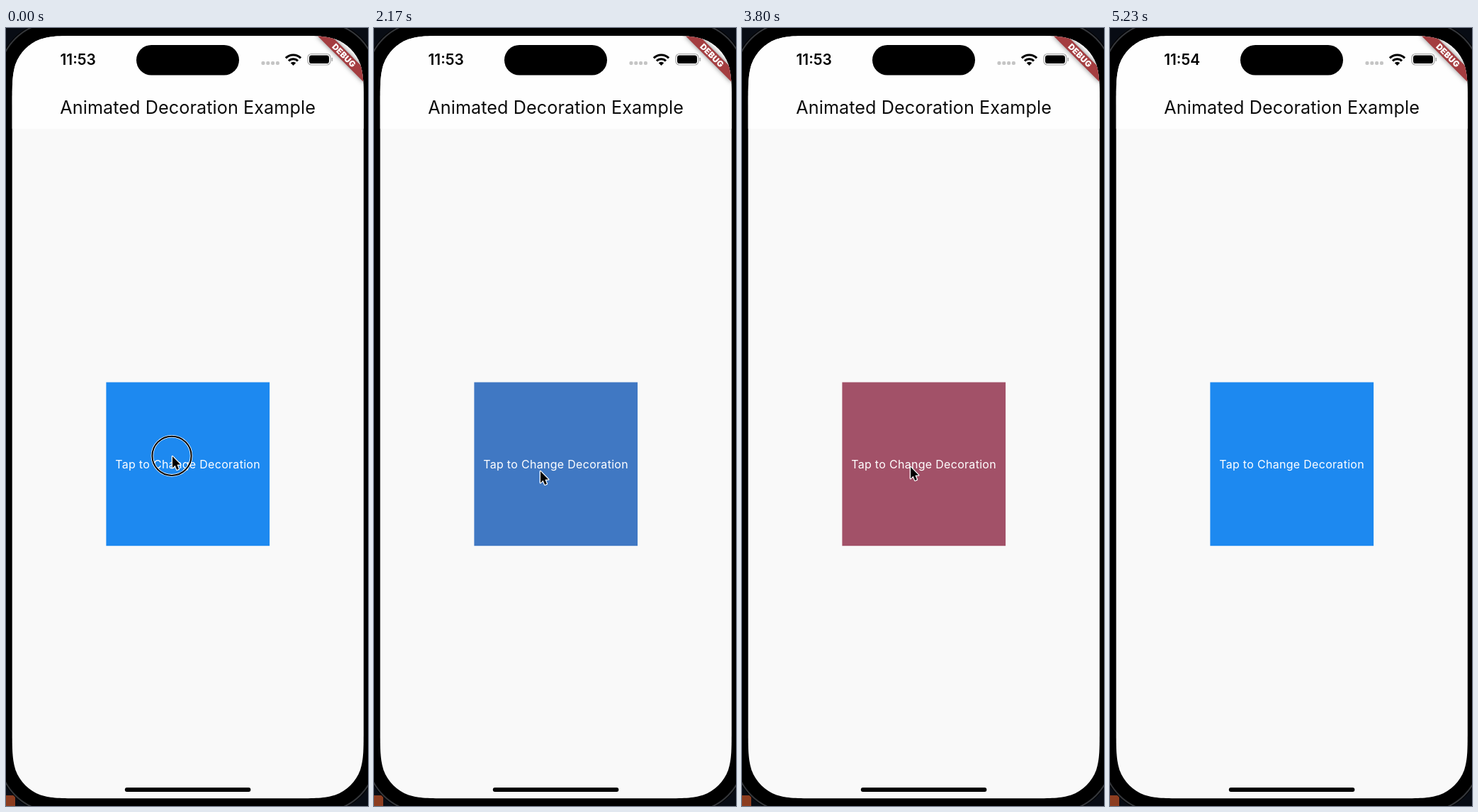
Animation, 511 px wide and 1097 px high, one loop 5.26 s. Source, as an HTML page with a canvas:

```html
<!DOCTYPE html>
<html lang="en">
<head>
<meta charset="utf-8">
<title>Animated Decoration Example</title>
<style>
  html, body { margin: 0; width: 100%; height: 100%; overflow: hidden; background: #000; }
  canvas { display: block; width: 511px; height: 1097px; }
</style>
</head>
<body>
<canvas id="stage"></canvas>
<script>
const W = 511, H = 1097, LOOP = 5260;
const FONT = 'Inter, Roboto, sans-serif';
const canvas = document.getElementById('stage');
const ctx = canvas.getContext('2d');
const ratio = window.devicePixelRatio || 1;
canvas.width = Math.round(W * ratio);
canvas.height = Math.round(H * ratio);

// Each entry: position, then the value or values there
const SWING = [[2056, 0], [2716, 1], [3376, 0], [4025, 1], [4660, 0]];
const COLOURS = [
  [0, 29, 137, 240], [0.173, 64, 120, 195], [0.225, 75, 114, 178],
  [0.409, 112, 102, 150], [0.653, 162, 81, 104], [1, 232, 58, 52]
];
const POINTER = [[1850, 234, 602], [2030, 234, 623], [3400, 234, 623], [3700, 237, 617]];
const PRESS_END = 2030, POINTER_END = 4200, CLOCK_TICK = 4650;

function track(keys, x) {
  if (x <= keys[0][0]) return keys[0].slice(1);
  for (let i = 1; i < keys.length; i++) {
    const a = keys[i - 1], b = keys[i];
    if (x <= b[0]) {
      const k = (x - a[0]) / (b[0] - a[0]);
      return a.slice(1).map((v, j) => v + (b[j + 1] - v) * k);
    }
  }
  return keys[keys.length - 1].slice(1);
}

function roundBox(x, y, w, h, r) {
  ctx.beginPath();
  ctx.roundRect(x, y, w, h, r);
}

// Box with corners of continuous curvature
function smoothBox(x, y, w, h, r) {
  const [a, b, c, d, e, f, g] = [1.5287, 1.0885, 0.8684, 0.6315, 0.3728, 0.1691, 0.0749].map(v => v * r);
  const corner = (cx, cy, ux, uy) => {
    // u runs along the incoming edge, v along the outgoing one
    const vx = -uy, vy = ux;
    const at = (p, q) => [cx - ux * p + vx * q, cy - uy * p + vy * q];
    ctx.lineTo(...at(a, 0));
    ctx.bezierCurveTo(...at(b, 0), ...at(c, 0), ...at(d, g));
    ctx.bezierCurveTo(...at(e, f), ...at(f, e), ...at(g, d));
    ctx.bezierCurveTo(...at(0, c), ...at(0, b), ...at(0, a));
  };
  ctx.beginPath();
  corner(x + w, y, 1, 0);
  corner(x + w, y + h, 0, 1);
  corner(x, y + h, -1, 0);
  corner(x, y, 0, -1);
  ctx.closePath();
}

function fillBox(x, y, w, h, r, fill) {
  roundBox(x, y, w, h, r);
  ctx.fillStyle = fill;
  ctx.fill();
}

function label(str, x, y, size, weight, fill, spacing = 0) {
  ctx.font = `${weight} ${size}px ${FONT}`;
  ctx.letterSpacing = spacing + 'px';
  ctx.textAlign = 'center';
  ctx.textBaseline = 'alphabetic';
  ctx.fillStyle = fill;
  ctx.fillText(str, x, y);
}

function drawCase() {
  ctx.fillStyle = '#080c14';
  ctx.fillRect(0, 0, W, H);
  ctx.fillStyle = '#8c3d20';
  ctx.fillRect(0, 1082, 13, 15);
  smoothBox(-14, -12, 541, 1121, 88);
  ctx.fillStyle = '#000';
  ctx.fill();
  smoothBox(-12, -10, 537, 1117, 86);
  ctx.strokeStyle = '#35373b';
  ctx.lineWidth = 2;
  ctx.stroke();
}

function drawWifi() {
  const x = 405.5, y = 53;
  const from = -Math.PI * 0.75, to = -Math.PI * 0.25;
  ctx.fillStyle = ctx.strokeStyle = '#000';
  ctx.beginPath();
  ctx.moveTo(x, y);
  ctx.arc(x, y, 5.3, from, to);
  ctx.fill();
  ctx.lineWidth = 3.1;
  for (const r of [9.2, 15]) {
    ctx.beginPath();
    ctx.arc(x, y, r, from, to);
    ctx.stroke();
  }
}

function drawStatus(time) {
  label(time, 101.7, 52.2, 20.9, 600, '#000');
  fillBox(184, 24, 145, 42.5, 21.2, '#000');
  for (let i = 0; i < 4; i++) fillBox(360.5 + i * 6.8, 47, 5, 5, 1.8, '#c5c5c5');
  drawWifi();
  roundBox(426, 36.5, 32, 15.5, 5);
  ctx.strokeStyle = '#a5a5a5';
  ctx.lineWidth = 1.2;
  ctx.stroke();
  fillBox(428, 38.4, 28, 11.7, 3.4, '#000');
  fillBox(459.4, 41.7, 1.8, 5.2, 1, '#adadad');
}

function drawRibbon() {
  ctx.save();
  ctx.translate(504.8, 11);
  ctx.rotate(Math.PI / 4);
  ctx.shadowColor = 'rgba(0,0,0,.5)';
  ctx.shadowBlur = 7 * ratio;
  ctx.fillStyle = '#a43d40';
  ctx.fillRect(-46.1, 32.3, 92.2, 13.8);
  ctx.shadowColor = 'transparent';
  label('DEBUG', 0, 43.4, 11.7, 900, '#fff', 0.2);
  ctx.restore();
}

function drawPointer(t) {
  if (t >= POINTER_END) return;
  const [x, y] = track(POINTER, t);
  ctx.lineJoin = 'round';
  if (t < PRESS_END) {
    ctx.beginPath();
    ctx.arc(234, 603.3, 27.6, 0, Math.PI * 2);
    ctx.strokeStyle = '#fff';
    ctx.lineWidth = 3.6;
    ctx.stroke();
    ctx.strokeStyle = '#000';
    ctx.lineWidth = 2;
    ctx.stroke();
  }
  const arrow = [[0, 0], [0, 16.2], [3.7, 12.8], [6.2, 18.9], [8.9, 17.8], [6.4, 11.8], [11.2, 11.6]];
  ctx.beginPath();
  for (const [dx, dy] of arrow) ctx.lineTo(x + 1 + dx, y + 2 + dy);
  ctx.closePath();
  ctx.strokeStyle = '#fff';
  ctx.lineWidth = 2.5;
  ctx.stroke();
  ctx.fillStyle = '#000';
  ctx.fill();
}

function draw(t) {
  ctx.setTransform(ratio, 0, 0, ratio, 0, 0);
  drawCase();

  ctx.save();
  smoothBox(8.7, 11, 496.1, 1075.2, 63.4);
  ctx.clip();
  ctx.fillStyle = '#f9f9f9';
  ctx.fillRect(0, 0, W, H);
  ctx.fillStyle = '#fefefe';
  ctx.fillRect(0, 0, W, 142);
  drawStatus(t < CLOCK_TICK ? '11:53' : '11:54');
  label('Animated Decoration Example', 256.6, 120.8, 25.2, 400, '#0c0c0c', 0.08);

  const [mix] = track(SWING, t);
  ctx.fillStyle = `rgb(${track(COLOURS, mix).map(Math.round).join(',')})`;
  ctx.fillRect(141.4, 499.5, 230.7, 230.7);
  label('Tap to Change Decoration', 256.6, 621, 16, 400, '#fff', 0.3);

  fillBox(167.8, 1071.1, 177.6, 5.8, 2.9, '#000');
  drawRibbon();
  ctx.restore();

  drawPointer(t);
}

const start = performance.now();
function tick() {
  draw((performance.now() - start) % LOOP);
  requestAnimationFrame(tick);
}
tick();
</script>
</body>
</html>
```
